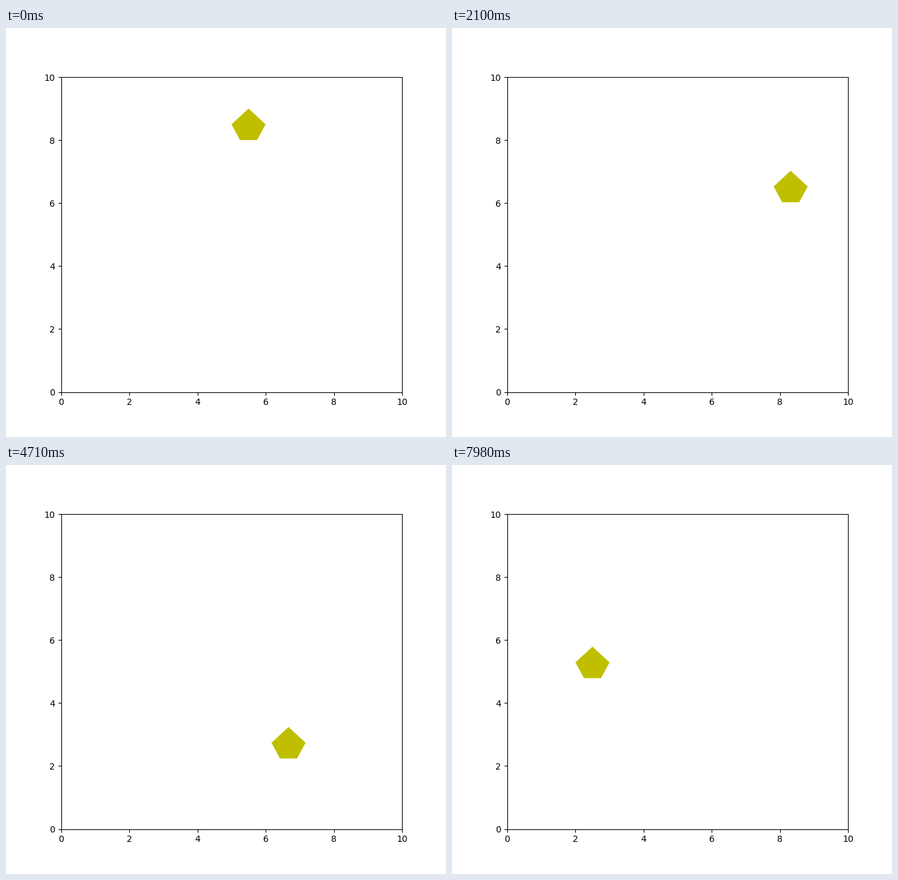
Animation of 700x650 px, one loop 8000 ms. Source, as a matplotlib script:

```python
import numpy as np
import matplotlib.pyplot as plt
from matplotlib.animation import FuncAnimation
from matplotlib.patches import Polygon

LOOP = 8000   # ms
TICK = 20     # ms between draws
STEP = 30     # ms per degree of travel
RADIUS = 3

# Pentagon corners relative to its apex
SHAPE = np.array([(0, 0), (0.5, -0.5), (0.25, -1), (-0.25, -1), (-0.5, -0.5)])

plt.rcParams["font.family"] = "DejaVu Sans"
fig, ax = plt.subplots(figsize=(7, 6.5), dpi=100)
ax.set(xlim=(0, 10), ylim=(0, 10))


def corners(degrees):
    """Pentagon moved clockwise along a circle, without turning."""
    a = np.radians(degrees)
    return SHAPE + (5.5 + RADIUS * np.sin(a), 6 + RADIUS * np.cos(a))


pentagon = ax.add_patch(Polygon(corners(0), closed=True, fc="y", ec="none", lw=0))


def init():
    pentagon.set_xy(corners(0))
    return (pentagon,)


def update(frame):
    pentagon.set_xy(corners(round(frame * TICK / STEP)))
    return (pentagon,)


anim = FuncAnimation(fig, update, frames=LOOP // TICK, init_func=init,
                     interval=TICK, repeat=True, repeat_delay=0)
plt.show()
```
